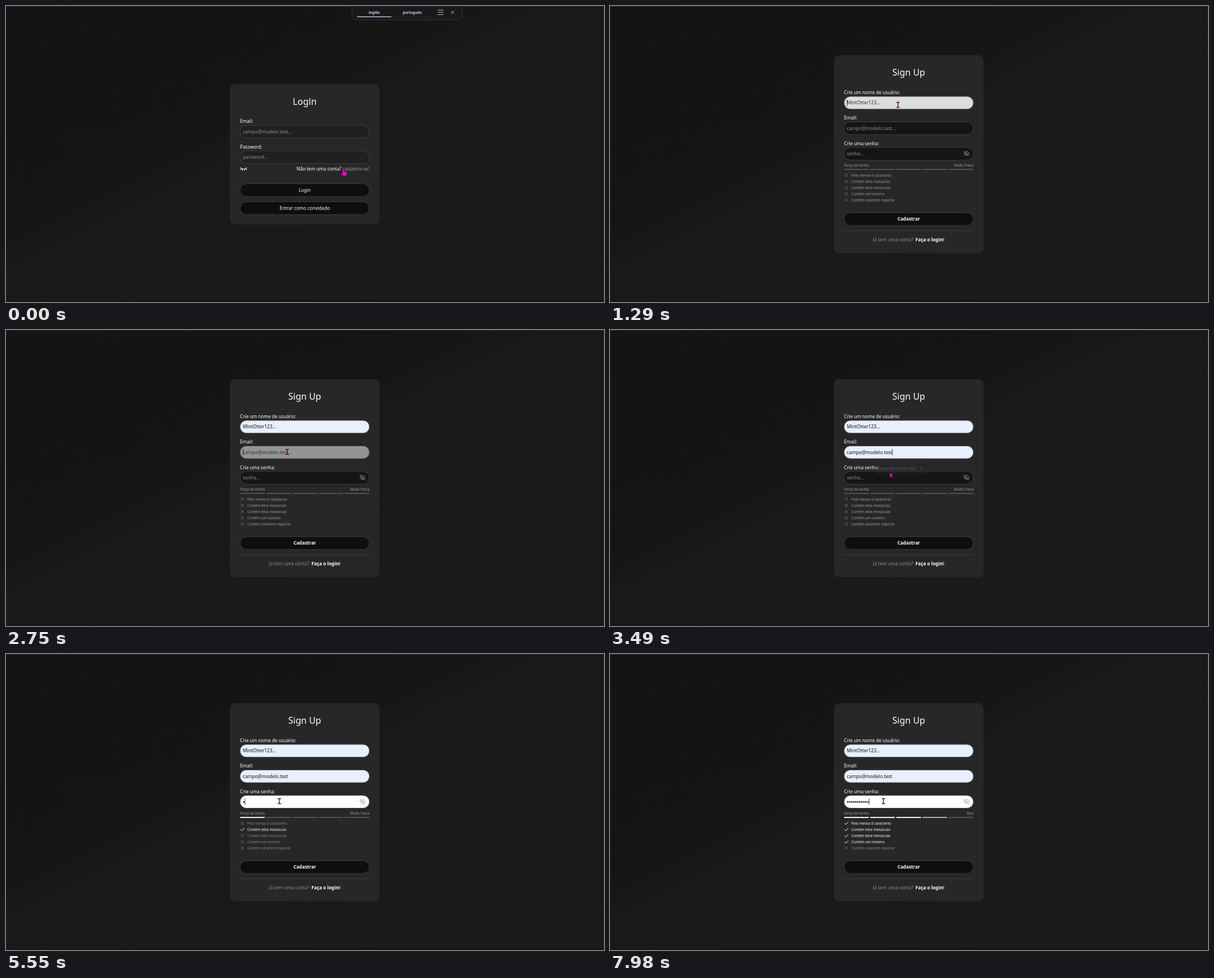
Write an HTML page that moves like this. It is 1063 by 527 pixels and loops after 8 s.

```html
<!DOCTYPE html>
<html lang="pt">
<head>
<meta charset="utf-8">
<title>Sign Up</title>
<style>
html, body { margin: 0; width: 100%; height: 100%; overflow: hidden; background: #191919; }
body { background: linear-gradient(to bottom right, #141414, #151515 37%, #191919 46%, #1b1b1b); }
svg { display: block; width: 100%; height: 100%; }
text { font: 8.3px "Noto Sans", "Open Sans", sans-serif; fill: #fff; white-space: pre; }
.title { font-size: 16px; }
.label { font-size: 8.2px; font-weight: 500; }
.small { font-size: 6.2px; }
.bold { font-size: 8.2px; font-weight: 600; }
.tab { font-size: 6.5px; font-weight: 600; }
.hint { font-size: 6.75px; fill: #d6d6d6; }
.mid { text-anchor: middle; }
.end { text-anchor: end; }
.line { fill: none; stroke-linecap: round; stroke-linejoin: round; }
</style>
</head>
<body>
<svg id="stage" viewBox="0 0 1063 527"></svg>
<script>
const LOOP = 8000;
const USER = 'MintOtter123...';
const MAIL = 'campo@modelo.test';
const GREY = '#9a9ca1', EDGE = '#3a4150';

const text = (x, y, str, cls = '', attrs = '') =>
  `<text x="${x}" y="${y}" class="${cls}" ${attrs}>${str}</text>`;
const box = (x, y, w, h, r, fill, attrs = '') =>
  `<rect x="${x}" y="${y}" width="${w}" height="${h}" rx="${r}" fill="${fill}" ${attrs}/>`;
const line = (d, color, width = 1, attrs = '') =>
  `<path class="line" d="${d}" stroke="${color}" stroke-width="${width}" ${attrs}/>`;
const pill = (y, fill, attrs = '') =>
  box(416, y, 230, 22.7, 11.35, fill, `stroke="${EDGE}" stroke-width=".9" ${attrs}`);
const cross = (x, y, r, color, width, attrs) =>
  line(`M${x - r} ${y - r}l${2 * r} ${2 * r}m0 ${-2 * r}l${-2 * r} ${2 * r}`, color, width, attrs);

const translateBar = `<g id="bar">
  <path d="M615 0V17Q615 24.5 622.5 24.5H803Q810.5 24.5 810.5 17V0" fill="#191919" stroke="#383838"/>
  ${text(654.5, 13.8, 'inglês', 'tab mid', 'style="fill:#d9c5f3"')}
  ${text(722, 13.8, 'português', 'tab mid', 'style="fill:#bfd0e6"')}
  ${line('M685 19.5H760', '#343438', .8)}
  ${line('M624.5 19.3H684.5', '#c9b3e6', 1.4)}
  ${line('M768 7.2h9.5m-9.5 4h9.5m-9.5 4h9.5', '#c4c4c4')}
  ${cross(793.8, 11.2, 2.2, '#d0d0d0', .9)}</g>`;

const login = `<g id="login">
  ${box(398, 139, 266, 250, 9, '#272727')}
  ${text(531, 175.7, 'Log<tspan font-family="Open Sans, sans-serif">I</tspan>n', 'title mid')}
  ${text(416, 208.4, 'Email:', 'label')}
  ${pill(212.3, '#202020')}
  ${text(421, 226.8, MAIL + '...', '', 'style="fill:#8d8d8d"')}
  ${text(416, 253.9, 'Password:', 'label')}
  ${pill(257.8, '#202020')}
  ${text(421, 272.2, 'password...', '', 'style="fill:#8d8d8d"')}
  ${line('M417 288q5.3 5 10.7 0M417.8 290.2l-1.2 1.3M420.6 291.4l-.6 1.7M424 291.4l.6 1.7M426.9 290.2l1.2 1.3', '#eee', 1.1)}
  ${text(596.2, 292.8, 'Não tem uma conta?', 'label end')}
  ${text(646, 292.8, 'cadastre-se!', 'end', 'id="link"')}
  ${pill(316.6, '#0e0e0e')}
  ${text(531, 330.9, 'Login', 'label mid')}
  ${pill(348.6, '#0e0e0e')}
  ${text(531, 362.9, 'Entrar como convidado', 'label mid')}</g>`;

const field = (id, y, label, hint) => text(416, y - 4, label, 'label') + pill(y, '#151515') +
  pill(y, '#fff', `id="${id}Light"`) + text(421, y + 14.3, hint, '', `id="${id}Text"`);

const rules = ['Pelo menos 6 caracteres', 'Contém letra maiúscula', 'Contém letra minúscula',
  'Contém um número', 'Contém caractere especial'];
const ruleRows = rules.map((rule, i) => {
  const y = 301.4 + i * 11.1;
  return cross(420, y - .2, 2.4, '#80838a', .8, `id="no${i}"`) +
    line(`M417.2 ${y}l2 2.1 4.2-4.4`, '#fff', 1, `id="yes${i}"`) +
    text(429, y + 2.4, rule, 'small', `id="rule${i}"`);
}).join('');

const meter = [0, 1, 2, 3, 4].map(i => {
  const x = 416 + i * 46.45;
  return box(x, 290, 44.2, 2.1, 1, '#485062') + box(x, 290, 44.2, 2.1, 1, '#f3f3f3', `id="seg${i}"`);
}).join('');

const dots = Array.from({ length: 11 }, (_, i) =>
  `<circle id="dot${i}" cx="${422.8 + i * 3.55}" cy="263.4" r="1.3" fill="#111"/>`).join('');

const suggestion = (id, y, width, str) => `<g id="${id}">
  ${box(471, y, width, 21, 3, '#292a2d', 'stroke="#3b3c40" stroke-width=".8"')}
  ${text(478, y + 12.7, str, 'hint')}
  ${cross(471 + width - 11, y + 10.3, 2.1, '#c8c8c8', .8)}</g>`;

const signup = `<g id="signup">
  ${box(398, 87.5, 266, 352.5, 9, '#272727')}
  ${text(531, 124, 'Sign Up', 'title mid')}
  ${field('user', 161, 'Crie um nome de usuário:', USER)}
  ${field('mail', 206.4, 'Email:', MAIL + '...')}
  ${field('pass', 251.8, 'Crie uma senha:', 'senha...')}
  ${dots}
  <g id="eye" transform="translate(628.2 257) scale(.465)" stroke="#a3a9b5" stroke-width="2" class="line">
    <path d="M10.7 5.1a10.7 10.7 0 0 1 11.2 6.6 1 1 0 0 1 0 .7 10.7 10.7 0 0 1-1.4 2.5M14.1 14.2a3 3 0 0 1-4.2-4.2M17.5 17.5a10.7 10.7 0 0 1-15.4-5.2 1 1 0 0 1 0-.7 10.7 10.7 0 0 1 4.4-5.1M2 2l20 20"/>
  </g>
  ${text(416, 286.2, 'Força da senha', 'small', `style="fill:${GREY}"`)}
  ${text(646, 286.2, '', 'small end', `id="grade" style="fill:${GREY}"`)}
  ${meter}${ruleRows}
  ${pill(368, '#0e0e0e')}
  ${text(531, 382.4, 'Cadastrar', 'bold mid')}
  ${line('M416 400.2H646', '#3b4254', 1)}
  ${text(467.5, 418.9, 'Já tem uma conta?', '', 'style="fill:#858aa0"')}
  ${text(594, 418.9, 'Faça o login!', 'bold end')}
  ${box(0, 0, .8, 11, 0, '#111', 'id="caret"')}
  ${suggestion('userTip', 190, 84, USER)}
  ${suggestion('mailTip', 236, 94, MAIL)}</g>`;

const pointers = `<g id="pointer">
  <path id="arrow" d="M0 0V8.6L2 6.9 3.3 9.8 4.8 9.1 3.5 6.3 6 6.1Z" fill="#ff00c8" stroke="#3a0030" stroke-width=".4"/>
  <path id="hand" d="M-2.3-5.5q1-1 1.7 0V-2l4.2.9q1.3.4 1.1 1.7L4 4.4 2.9 5.8H-1.2L-4 2.2q-.7-1.2.4-1.5L-2.3 1.5Z" fill="#ff00c8"/>
  <path id="beam" class="line" d="M-2.5-4.6H2.5M-2.5 4.6H2.5M0-4.6V4.6" stroke-width="1.5"/></g>`;

const stage = document.getElementById('stage');
stage.innerHTML = box(0, 0, 1063, .8, 0, '#303030') + box(0, 524.5, 1063, 2.5, 0, '#141414') +
  box(1062, 0, 1, 527, 0, '#222') + translateBar + login + signup + pointers;

const el = id => document.getElementById(id);
const show = (id, on) => el(id).style.visibility = on ? 'visible' : 'hidden';
const fade = (id, v) => el(id).style.opacity = v;
const ramp = (t, from, to) => Math.min(1, Math.max(0, (t - from) / (to - from)));
const easeOut = p => 1 - (1 - p) ** 3;
const smooth = p => p * p * (3 - 2 * p);
const count = (times, t) => times.filter(at => t >= at).length;

// Time, position and the shape used from that moment on.
const path = [
  [0, 601, 296.5, 'hand'], [370, 601, 296.5, 'arrow'], [620, 566, 245, 'beam'], [810, 543, 206, 'beam'],
  [1170, 512, 176, 'beam'], [1540, 512, 176, 'beam'], [1720, 508, 197, 'arrow'], [1830, 507, 200, 'arrow'],
  [2080, 507, 200, 'arrow'], [2200, 505, 206, 'beam'], [2300, 504, 208, 'beam'], [2650, 500, 217, 'beam'],
  [2900, 500, 217, 'beam'], [3060, 498, 241, 'arrow'], [3150, 498, 245, 'arrow'], [3370, 498, 245, 'arrow'],
  [3490, 497.5, 253.5, 'arrow'], [3580, 495, 262, 'beam'], [3640, 494, 264, 'beam'], [3890, 494, 264, 'beam'],
  [4100, 490, 266, 'beam'], [4480, 490, 266, 'beam'], [4630, 486, 262, 'beam'], [LOOP, 486, 262, 'beam']];
const typed = [5370, 5880, 5980, 6080, 6900, 7180, 7300, 7420, 7870, 7920, 7970];
const passed = [5370, 5880, 7180, 7870];
const ruleTimes = [7180, 5370, 5880, 7870, Infinity];
const grades = ['Muito Fraca', 'Muito Fraca', 'Fraca', 'Média', 'Boa'];
const caretOn = [[1200, 1700], [2080, 2620], [2680, 3180], [3370, 3900], [3960, 4480],
  [4990, 6610], [6900, LOOP]];

function drawField(id, t, focus, filled) {
  const light = ramp(t, focus, focus + 130);
  fade(id + 'Light', light);
  el(id + 'Light').setAttribute('fill', t >= filled ? '#e8f0fe' : '#fff');
  el(id + 'Text').style.fill = t >= filled ? '#111' : light > .5 ? '#333' : '#8d8d8d';
}

function drawCaret(t, chars) {
  let x = 421, y = 167;
  if (t >= 3960) { y = 257.5; x += chars * 3.55; }
  else if (t >= 2680) { y = 212; if (t >= 3370) x += el('mailText').getComputedTextLength(); }
  else if (t >= 2080) x += el('userText').getComputedTextLength();
  el('caret').setAttribute('x', x);
  el('caret').setAttribute('y', y);
  show('caret', caretOn.some(([from, to]) => t >= from && t < to));
}

function drawPointer(t) {
  const i = path.findIndex((p, k) => t >= p[0] && t < path[k + 1][0]);
  const [t0, x0, y0, shape] = path[i], [t1, x1, y1] = path[i + 1];
  const p = ramp(t, t0, t1);
  el('pointer').setAttribute('transform', `translate(${x0 + (x1 - x0) * p} ${y0 + (y1 - y0) * p})`);
  for (const id of ['arrow', 'hand', 'beam']) show(id, id === shape);
  const onLight = t >= 1200 && t < 1720 || t >= 2700 && t < 3060 || t >= 3960;
  el('beam').setAttribute('stroke', onLight ? '#5c0b3c' : '#78005e');
}

function draw(t) {
  const opened = t >= 370;
  el('bar').style.display = el('login').style.display = opened ? 'none' : '';
  el('signup').style.display = opened ? '' : 'none';
  const hover = Math.round(150 + 105 * smooth(ramp(t, 20, 210)));
  el('link').style.fill = `rgb(${hover},${hover},${hover})`;
  const entry = easeOut(ramp(t, 370, 790));
  fade('signup', entry);
  el('signup').setAttribute('transform', `translate(0 ${11 * (1 - entry)})`);

  drawField('user', t, 1180, 2080);
  drawField('mail', t, 2680, 3370);
  drawField('pass', t, 3960, Infinity);
  el('mailText').textContent = t >= 3370 ? MAIL : MAIL + '...';
  el('eye').setAttribute('stroke', t >= 4030 ? '#9198a6' : '#a3a9b5');
  fade('userTip', ramp(t, 1540, 1740) * (1 - ramp(t, 2080, 2290)));
  fade('mailTip', ramp(t, 2900, 3100) * (1 - ramp(t, 3370, 3540)));

  const chars = count(typed, t);
  show('passText', opened && !chars);
  for (let i = 0; i < 11; i++) show('dot' + i, opened && i < chars);
  el('grade').textContent = grades[count(passed, t)];
  for (let i = 0; i < 5; i++) {
    fade('seg' + i, i < 4 ? smooth(ramp(t, passed[i], passed[i] + 200)) : 0);
    const ok = t >= ruleTimes[i];
    show('yes' + i, ok);
    show('no' + i, !ok);
    el('rule' + i).style.fill = ok ? '#fff' : chars ? '#84868b' : GREY;
  }
  drawCaret(t, chars);
  drawPointer(t);
}

const start = performance.now();
function frame() {
  draw((performance.now() - start) % LOOP);
  requestAnimationFrame(frame);
}
frame();
</script>
</body>
</html>
```
